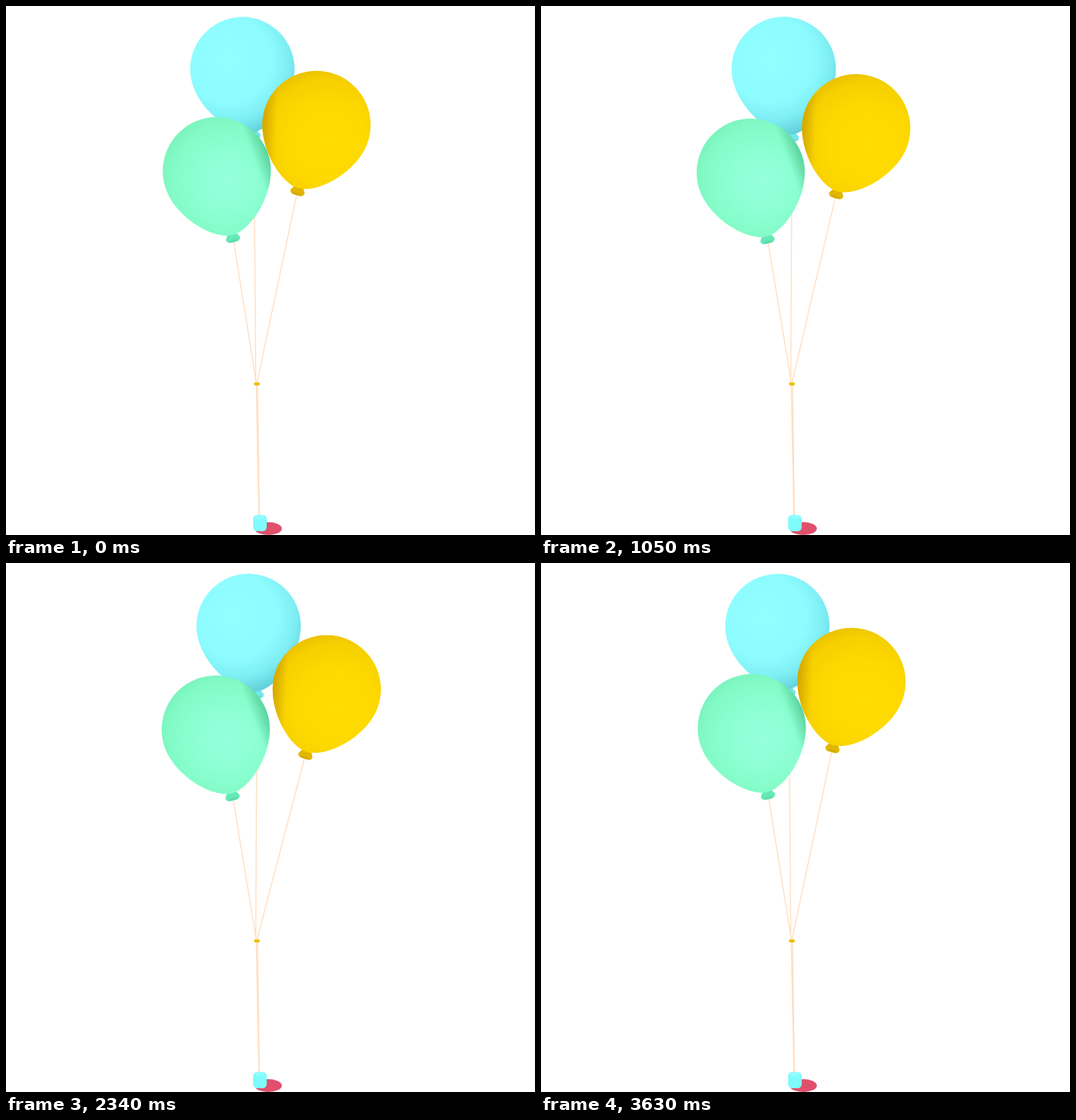
Recreate the animation shown at these times as an HTML page. Size 700 px wide and 700 px high, loop 3660 ms.

```html
<!DOCTYPE html>
<html lang="en">
<head>
<meta charset="utf-8">
<title>Balloons</title>
<style>
  html, body { margin: 0; width: 100%; height: 100%; overflow: hidden; background: #fff; }
  svg { display: block; width: 100vw; height: 100vh; }
  .string { stroke: #ffdfc2; stroke-width: 1.4; fill: none; }
</style>
</head>
<body>
<svg viewBox="0 0 700 700">
  <defs>
    <radialGradient id="blue" gradientUnits="userSpaceOnUse" cx="-16" cy="-14" r="102">
      <stop offset="0" stop-color="#92ffff"/>
      <stop offset=".55" stop-color="#8dfcff"/>
      <stop offset=".78" stop-color="#7eeef4"/>
      <stop offset="1" stop-color="#62cfda"/>
    </radialGradient>
    <radialGradient id="green" gradientUnits="userSpaceOnUse" cx="10" cy="16" r="100">
      <stop offset="0" stop-color="#94ffdd"/>
      <stop offset=".35" stop-color="#8fffd6"/>
      <stop offset=".75" stop-color="#82fbc6"/>
      <stop offset="1" stop-color="#76efb8"/>
    </radialGradient>
    <radialGradient id="yellow" gradientUnits="userSpaceOnUse" cx="20" cy="18" r="104">
      <stop offset="0" stop-color="#ffdd00"/>
      <stop offset=".5" stop-color="#fdd900"/>
      <stop offset=".8" stop-color="#f6d000"/>
      <stop offset="1" stop-color="#e6bd00"/>
    </radialGradient>
    <linearGradient id="greenRim" gradientUnits="userSpaceOnUse" x1="0" y1="0" x2="71" y2="-8">
      <stop offset=".72" stop-color="#4fc893" stop-opacity="0"/>
      <stop offset="1" stop-color="#4fc893" stop-opacity=".8"/>
    </linearGradient>
    <linearGradient id="yellowRim" gradientUnits="userSpaceOnUse" x1="0" y1="0" x2="-69" y2="18">
      <stop offset=".74" stop-color="#c99a00" stop-opacity="0"/>
      <stop offset="1" stop-color="#c99a00" stop-opacity=".75"/>
    </linearGradient>
  </defs>
  <ellipse cx="347" cy="691.5" rx="18" ry="8.5" fill="#e0506c"/>
  <g id="scene"></g>
  <path class="string" d="M331.2 501L334.6 675M332.8 501L335.4 675"/>
  <ellipse cx="332" cy="500" rx="4" ry="2.3" fill="#efc000"/>
  <rect x="327" y="673.5" width="18" height="21.5" rx="5.5" fill="#80fbfb"/>
  <ellipse cx="336" cy="676.5" rx="6" ry="2.4" fill="#92ffff"/>
</svg>
<script>
const LOOP = 3660, STEP = 30;
const scene = document.getElementById('scene');

// Each pair is [rest, swing]: value at rest and change at full swing.
const balloons = [
  { fill: 'blue', knot: '#74e6ee', r: 69, x: [312.8, 12.9], y: [83.5, -.3], tilt: [-9.4, 4.4],
    drop: [85, 4], foot: [330.5, 497], peak: 1750, end: 3190 },
  { fill: 'green', rim: 'greenRim', knot: '#66e8b6', r: 71.6, x: [279, -2.2], y: [218.6, 2.9], tilt: [-13.5, -.7],
    drop: [87, 0], foot: [331, 497], peak: 1750, end: 3190 },
  { fill: 'yellow', rim: 'yellowRim', knot: '#e2b600', r: 71.7, x: [410.8, 13.7], y: [157.4, 9.8], tilt: [15.8, 2],
    drop: [87, 0], foot: [332.5, 497], peak: 2240, end: 3660 }
];

function add(parent, tag, attrs) {
  const el = document.createElementNS('http://www.w3.org/2000/svg', tag);
  for (const k in attrs) el.setAttribute(k, attrs[k]);
  return parent.appendChild(el);
}

function outline(r, h) {
  return `M${-r} 0A${r} ${r} 0 0 1 ${r} 0C${r} 43 27 ${h} 0 ${h}S${-r} 43 ${-r} 0Z`;
}

for (const b of balloons) {
  b.string = add(scene, 'path', { class: 'string' });
  b.group = add(scene, 'g', {});
  b.tie = add(b.group, 'g', {});
  add(b.tie, 'path', { d: 'M-5 -7L5 -7L9.5 0Q10 5 4 5.6L-4 5.6Q-10 5 -9.5 0Z', fill: b.knot });
  add(b.tie, 'ellipse', { cy: 3.6, rx: 6, ry: 1.6, fill: '#000', opacity: .06 });
  b.skins = [b.fill, b.rim].filter(Boolean).map(id => add(b.group, 'path', { fill: `url(#${id})` }));
}

const ease = u => (1 - Math.cos(Math.PI * Math.min(1, Math.max(0, u)))) / 2;

function swing(t, peak, end) {
  return t < peak ? ease(t / peak) : 1 - ease((t - peak) / (end - peak));
}

function draw(t) {
  for (const b of balloons) {
    const p = swing(t, b.peak, b.end);
    const at = ([rest, change]) => rest + change * p;
    const x = at(b.x), y = at(b.y), tilt = at(b.tilt), h = at(b.drop);
    const a = tilt * Math.PI / 180, len = h + 9;
    b.group.setAttribute('transform', `translate(${x} ${y}) rotate(${tilt})`);
    b.tie.setAttribute('transform', `translate(0 ${h + 4})`);
    for (const s of b.skins) s.setAttribute('d', outline(b.r, h));
    b.string.setAttribute('d', `M${x - len * Math.sin(a)} ${y + len * Math.cos(a)}L${b.foot}`);
  }
}

const start = performance.now();
function tick() {
  const t = (performance.now() - start) % LOOP;
  draw(Math.floor(t / STEP) * STEP);
  requestAnimationFrame(tick);
}
tick();
</script>
</body>
</html>
```
